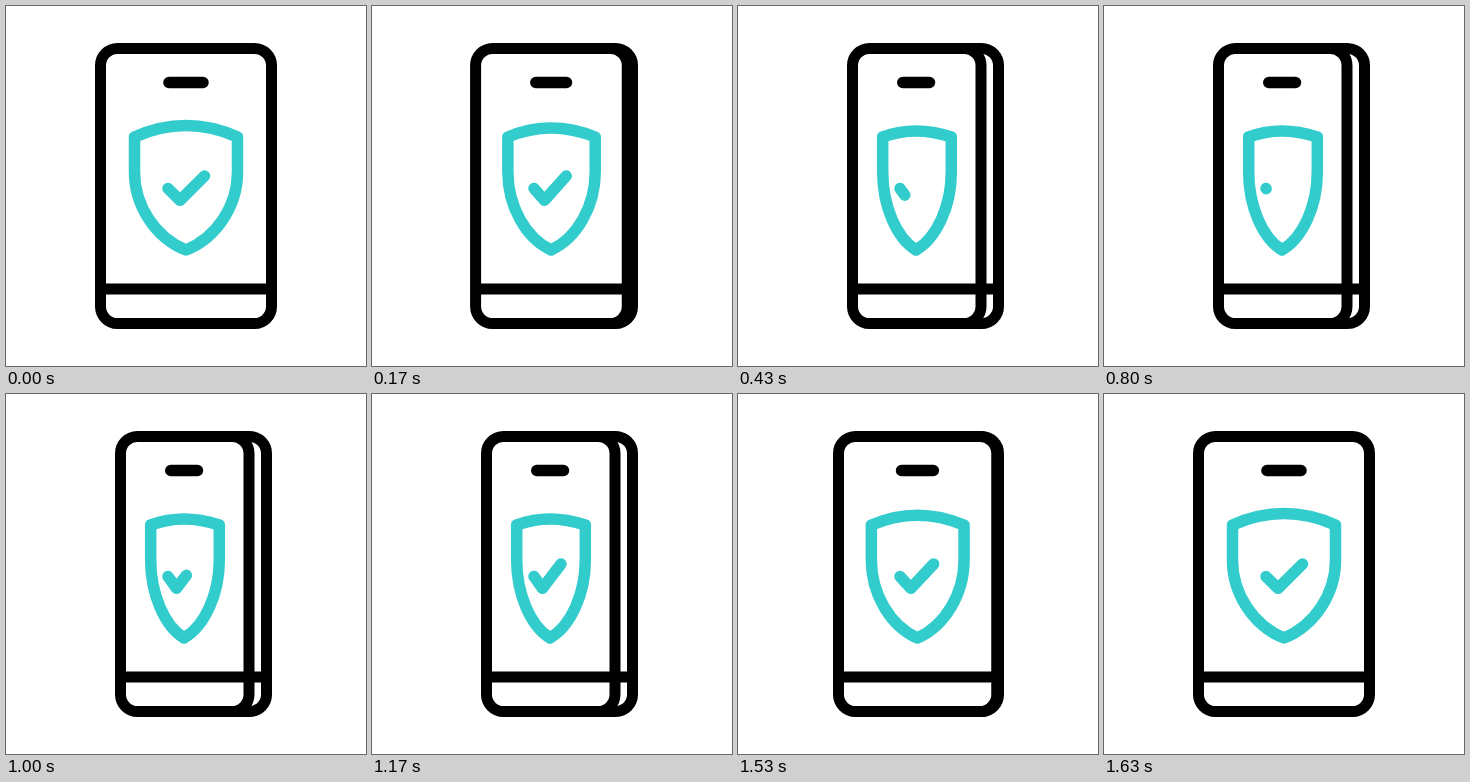
Recreate the animation shown at these times as an HTML page. Size 360 by 360 pixels, loop 1.67 s.

```html
<!DOCTYPE html>
<html lang="en">
<head>
<meta charset="utf-8">
<title>Secure phone</title>
<style>
html, body { margin: 0; height: 100%; overflow: hidden; background: #fff; }
svg { display: block; width: 100%; height: 100%; fill: none; stroke: #000; stroke-width: 11; }
.round { stroke-width: 11.5; stroke-linecap: round; stroke-linejoin: round; }
.teal { stroke: #3cc; }
</style>
</head>
<body>
<svg viewBox="0 0 360 360">
  <rect x="150" y="42.5" width="110.5" height="275" rx="17"/>
  <path d="M150 283H260"/>
  <rect id="front" y="42.5" height="275" rx="17" fill="#fff"/>
  <path id="bar"/>
  <path id="slot" class="round"/>
  <path id="shield" class="round teal"/>
  <path id="check" class="round teal" pathLength="1"/>
</svg>
<script>
const LOOP = 1670, FPS = 30;
const $ = id => document.getElementById(id);
const [front, bar, slot, shield, check] = ['front', 'bar', 'slot', 'shield', 'check'].map($);
const ramp = (n, a, b) => Math.min(1, Math.max(0, (n - a) / (b - a)));
const easeIn = x => 2 ** 1.5 * x ** 2.5;
const ease = x => x < .5 ? easeIn(x) : 1 - easeIn(1 - x);

function draw(now) {
  // Motion advances in steps of 1/30 s
  const n = Math.floor((now % LOOP + 3.5) * FPS / 1000);
  const turn = ramp(n, 0, 11) - ramp(n, 39, 49);
  const drawn = 1 - ease(ramp(n, 5, 17)) + ease(ramp(n, 23, 35));
  const mix = (a, b) => a + (b - a) * turn;

  const left = mix(94.5, 114.5), right = mix(265.5, 243);
  front.setAttribute('x', left);
  front.setAttribute('width', right - left);
  bar.setAttribute('d', `M${left} 283H${right}`);
  slot.setAttribute('d', `M${mix(163, 164.8)} 76.5H${mix(197, 191.5)}`);

  const l = mix(128.5, 144.7), r = mix(231.5, 213.3), c = mix(180, 178), top = mix(119.5, 125);
  const k = (c - l) * .42, m = (r - c) * .42;
  shield.setAttribute('d', `M${l} 131Q${c - k * 1.2} ${top} ${c} ${top}T${r} 131V166` +
    `C${r} 200 ${c + m * 1.4} 232 ${c} 244C${c - k * 1.4} 232 ${l} 200 ${l} 166Z`);

  check.setAttribute('d', `M162 182.5L${mix(174, 170.5)} 194.3L${mix(198.5, 189)} 170`);
  check.setAttribute('stroke-dasharray', `${drawn} 2`);
  check.setAttribute('visibility', drawn > 0 ? 'visible' : 'hidden');
  requestAnimationFrame(draw);
}
draw(performance.now());
</script>
</body>
</html>
```
